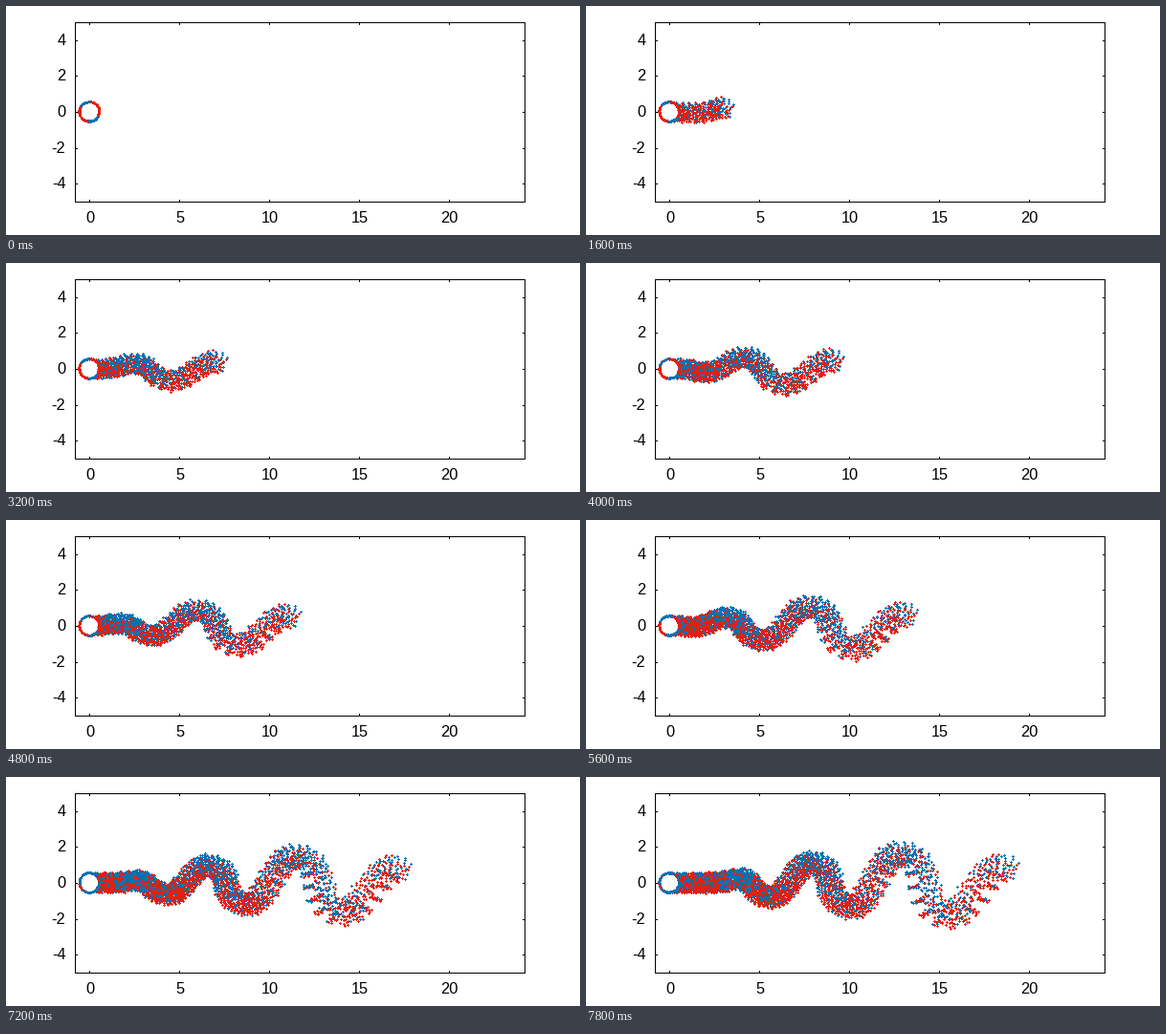
A matplotlib script for the animation above (8 s loop, 600x240 px).

```python
import numpy as np
import matplotlib.pyplot as plt
from matplotlib.animation import FuncAnimation
from matplotlib.patches import Circle

W, H, DPI = 600, 240, 100
FRAMES, STEP = 40, 200
PX = 72 / DPI                      # one pixel in points
LEFT, RIGHT, TOP, BOTTOM = 72, 542, 17, 205
SCALE = 18.8
RED, BLUE = "#e51e10", "#0072b2"


def to_px(x, y):
    return LEFT + (x + 0.8) * SCALE, TOP + (5 - y) * SCALE


# Particles leave the cylinder at a growing rate: 190 t + 45 t^2 in total.
# A low-discrepancy sequence spreads them evenly over the cylinder's disc.
k = np.arange(4450)
birth = (-190 + np.sqrt(190 ** 2 + 180 * k)) / 90
angle = 2 * np.pi * (k * 0.7548777 % 1)
radius = np.sqrt(k * 0.5698403 % 1)
off_x, off_y = radius * np.cos(angle), radius * np.sin(angle)

# Even phase is a crest, odd phase a trough; the front is a weak crest
phase = np.maximum(birth - 0.27, birth / 1.27)
speed = 2.2 + 0.3 * np.exp(-(birth / 2.2) ** 2)
strength = np.minimum(1, 0.35 + 0.5 * birth) / (1 + np.exp(4 * (birth - 6)))
steepen = np.where(np.sin(np.pi * phase) < 0, 0.12 * np.sin(2 * np.pi * phase), 0)
lag = 0.9 * np.exp(-1.5 * birth)

rng = np.random.default_rng(7)
blue_share = 0.45 + 0.22 * np.cos(3 * (birth - 1.9)) + 0.2 * off_y
is_blue = rng.uniform(0, 1, k.size) < blue_share


def wake(t):
    """Positions and colour flags of the particles released by time t."""
    age = np.maximum(t - birth, 0)
    x = speed * (age - steepen * np.minimum(age / 3, 1)) - lag
    y = strength * (0.2 + 0.26 * age) * (1 - np.exp(-age ** 2)) * np.cos(np.pi * phase)
    x = x + (0.55 + 0.07 * age) * off_x
    y = y + (0.57 + 0.03 * age) * off_y
    live = (birth < t) & (x > 0)
    return x[live], y[live], is_blue[live]


def ring(t):
    """Fresh particles on the cylinder wall."""
    r = np.random.default_rng(100 + round(t * 5))
    n = 130
    a = np.linspace(-np.pi, np.pi, n, endpoint=False)
    rad = 0.53 + (0.02 + 0.05 * np.maximum(np.cos(a), 0)) * r.uniform(0, 1, n)
    bias = 0.2 + 0.6 * np.tanh(2 * (t - 5.6))
    noise = r.normal(0, 0.1 + 0.04 * t, n)
    blue = np.cos(2 * (a - np.radians(120))) + bias + noise > 0
    return rad * np.cos(a), rad * np.sin(a), blue


fig = plt.figure(figsize=(W / DPI, H / DPI), dpi=DPI, facecolor="white")
ax = fig.add_axes([0, 0, 1, 1])
ax.set_xlim(0, W)
ax.set_ylim(H, 0)
ax.axis("off")


def line(x0, y0, x1, y1):
    ax.plot([x0 + .5, x1 + .5], [y0 + .5, y1 + .5], color="black", lw=PX,
            solid_capstyle="projecting", snap=False, zorder=5)


def label(x, y, text, ha):
    ax.text(x, y, text, ha=ha, va="baseline", family="Liberation Sans",
            fontsize=16.4 * PX, color="black")


for y in (TOP, BOTTOM):
    line(LEFT, y, RIGHT, y)
for x in (LEFT, RIGHT):
    line(x, TOP, x, BOTTOM)
for v in range(0, 21, 5):
    x = round(to_px(v, 0)[0])
    line(x, TOP, x, TOP + 2)
    line(x, BOTTOM, x, BOTTOM - 2)
    label(x + 0.5, 227, str(v), "center")
for v in range(-4, 5, 2):
    y = round(to_px(0, v)[1])
    line(LEFT, y, LEFT + 2, y)
    line(RIGHT, y, RIGHT - 2, y)
    label(62.5, y + 5, str(v), "right")


def dots(z):
    return ax.scatter([], [], s=(3 * PX) ** 2, marker="+", linewidths=PX,
                      snap=False, zorder=z)


wake_dots, ring_dots = dots(2), dots(4)
ax.add_patch(Circle(to_px(0, 0), 0.49 * SCALE, fc="white", ec="none", zorder=3))


def place(art, x, y, blue):
    px, py = to_px(x, y)
    art.set_offsets(np.column_stack([np.floor(px) + .5, np.floor(py) + .5]))
    art.set_color([BLUE if b else RED for b in blue])


def update(i):
    t = i * STEP / 1000
    place(wake_dots, *wake(t))
    place(ring_dots, *ring(t))
    return wake_dots, ring_dots


anim = FuncAnimation(fig, update, frames=FRAMES, interval=STEP,
                     repeat=True, repeat_delay=0, blit=False)
plt.show()
```
